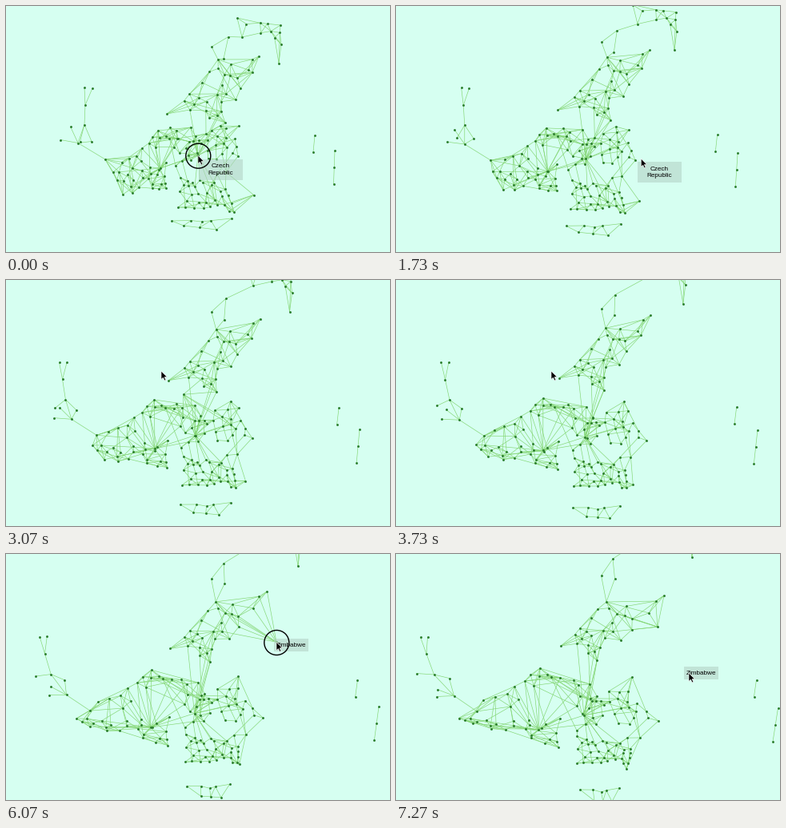
Animation, 480 px wide and 308 px high, one loop 7.34 s. Source, as a matplotlib script:

```python
import random

import numpy as np
import matplotlib.pyplot as plt
from matplotlib.animation import FuncAnimation
from matplotlib.collections import LineCollection
from matplotlib.patches import Circle, Polygon, Rectangle

W, H, DPI = 480, 308, 100
FRAMES, LOOP = 110, 7340
PX = 72 / DPI
BG, EDGE, NODE = "#d6fff1", "#84d674", "#2a7d2c"
rng = random.Random(11)

# How far the layout has spread, by frame
BEATS = [0, 16, 37, 55, 74, 100, 108]
SPREAD = [0, .185, .318, .615, .712, .9, 1]

start, end, group, edges = [], [], {}, set()


def add(name, a, b):
    """Add one node that goes from a to b over the loop."""
    start.append(np.array(a, float))
    end.append(np.array(b, float))
    group.setdefault(name, []).append(len(start) - 1)
    return len(start) - 1


def join(i, j):
    if i != j:
        edges.add((min(i, j), max(i, j)))


def strand(a, b, a2, b2, count):
    """A straight chain of evenly spaced nodes."""
    a, b, a2, b2 = map(np.array, (a, b, a2, b2))
    ids = [add("strand", a + (b - a) * t, a2 + (b2 - a2) * t)
           for t in np.linspace(0, 1, count)]
    for i, j in zip(ids, ids[1:]):
        join(i, j)


def blend(quad, u, v):
    a, b, c, d = np.array(quad, float)
    return (a * (1 - u) + b * u) * (1 - v) + (d * (1 - u) + c * u) * v


def patch(name, quad, quad2, count):
    """Scatter nodes over a quad, corners first, spaced well apart."""
    spots = [(0, 0), (1, 0), (1, 1), (0, 1)]
    while len(spots) < count:
        tries = [(rng.random(), rng.random()) for _ in range(4)]
        spots.append(max(tries, key=lambda s: min(
            np.hypot(*(blend(quad, *s) - blend(quad, *q))) for q in spots)))
    for s in spots:
        add(name, blend(quad, *s), blend(quad2, *s))


strand((386, 162), (384, 183), (450.5, 157.5), (447.5, 178.5), 2)
strand((411, 181), (409.5, 223), (477.5, 193), (471, 235), 3)

# Western branch: a stem, its fork and a spray of leaves
fork = add("branch", (99, 124), (38, 125))
knot = add("branch", (98, 148.5), (47.5, 151))
elbow = add("branch", (90, 171.5), (72.5, 177.5))
side = add("branch", (107, 169.5), (66.5, 155.5))
root = add("branch", (124, 192), (101, 197))
for a, b, hub in [((98, 102), (30.5, 104), fork), ((108, 103), (39.5, 103.5), fork),
                  ((92.5, 170), (25.5, 149.5), knot), ((80.5, 151), (51.5, 169.5), elbow),
                  ((68, 167.5), (50.5, 178.5), elbow)]:
    join(add("branch", a, b), hub)
for i, j in [(fork, knot), (knot, elbow), (knot, side), (side, elbow), (elbow, root)]:
    join(i, j)

# The top cluster leaves the stage in one piece, hanging on a loose chain
top = np.array([(289, 15), (343, 24), (344, 48), (295, 39)])
lift = np.array([29, -68])
patch("top", top, top + lift, 11)
tail = add("top", (341, 71.5), (370, 3.5))
bend = add("chain", (278, 38.5), (271, 6))
left = add("chain", (257, 51), (256.5, 27))
right = add("chain", (272, 66), (273.5, 31))

# Nodes with a part of their own
czech = add("centre", (238, 188), (235, 202))
latvia = add("centre", (250, 160), (243, 181))
zimbabwe = add("north", (308, 83), (305, 61))
west_hub = add("west", (193, 203), (178, 220))
add("centre", (268, 150), (295, 154))
spur = add("south", (309.5, 236.5), (288, 269))

patch("north", [(265, 67), (316, 63), (274, 146), (201, 135)],
      [(260, 56), (320, 32), (251, 133), (206, 115)], 29)
patch("arm", [(145, 195.5), (190, 156), (215, 166), (158, 203)],
      [(109, 183), (180, 143), (205, 155), (143, 191)], 14)
patch("west", [(134, 208), (200, 196), (200, 228), (146, 236)],
      [(78.5, 205.5), (205, 206), (203, 242), (96, 212)], 25)
patch("centre", [(205, 152), (291, 150), (290, 188), (212, 200)],
      [(222, 158), (290, 172), (328, 209), (226, 221)], 34)
patch("south", [(218, 215), (275, 208), (285, 258), (215, 252)],
      [(226, 228), (305, 230), (290, 262), (226, 262)], 34)
patch("foot", [(207, 269), (282, 266), (263, 280), (222, 275)],
      [(230, 295), (279, 293), (270, 310), (248, 309)], 8)

START, END = np.array(start), np.array(end)
LATE = START + (END - START) * .6


def gaps(i, ids):
    return np.hypot(*(LATE[ids] - LATE[i]).T)


def knit(ids, k, reach, far=0):
    """Join each node to its k nearest, plus some picks further out."""
    ids = np.array(ids)
    for i in ids:
        d = gaps(i, ids)
        order = [n for n in d.argsort()[1:] if d[n] < reach]
        picks = order[:k] + rng.sample(order[k:k + 14], min(far, len(order[k:k + 14])))
        for n in picks:
            join(i, ids[n])


def fan(hub, names, count, reach):
    pool = np.array([i for n in names for i in group[n]])
    pool = list(pool[gaps(hub, pool) < reach])
    for i in rng.sample(pool, min(count, len(pool))):
        join(hub, i)


knit(group["top"], 3, 40)
knit(group["north"], 3, 48, 1)
knit(group["arm"] + group["west"] + [root], 3, 42, 1)
knit(group["centre"] + group["south"], 2, 42, 1)
knit(group["foot"] + group["south"], 2, 38)
knit(group["arm"] + group["north"], 1, 45)
fan(west_hub, ["arm", "west"], 12, 75)
fan(west_hub, ["centre"], 4, 65)
fan(czech, ["centre", "south"], 12, 65)
fan(czech, ["north"], 4, 80)
fan(latvia, ["north", "centre"], 6, 60)
fan(root, ["arm", "west"], 4, 50)
fan(zimbabwe, ["north"], 5, 40)
fan(spur, ["south"], 2, 45)
for i in group["arm"]:
    if LATE[i, 0] > 175:
        fan(i, ["centre"], 2, 60)
north_top, top_left = group["north"][1], group["top"][3]
for i, j in [(top_left, bend), (bend, left), (bend, right), (left, north_top),
             (right, north_top), (tail, group["top"][2])]:
    join(i, j)
EDGES = np.array(sorted(edges))

# Pointer path: frame, x, y
PATH = np.array([(0, 240, 187), (3, 240, 187), (10, 300, 192), (16, 316, 197),
                 (24, 316, 197), (31, 248, 155), (37, 212, 137), (43, 194, 114),
                 (58, 194, 114), (74, 314, 67), (79, 314, 67), (82, 306, 66),
                 (97, 366, 149), (109, 366, 149)], float)
PRESSED = [(0, 10), (32, 43), (83, 98)]

# Dragged node, frames, strength of the pull towards the pointer
DRAGS = [(czech, [0, 10, 13, 16], [1, 1, .3, 0]),
         (latvia, [31, 33, 43, 47, 53], [0, 1, 1, .3, 0]),
         (zimbabwe, [82, 84, 98, 100, 104, 108], [0, 1, 1, .72, .3, .15])]

# Text, first and last frame, box size, then frames with left and top of the box
LABELS = [("Czech\nRepublic", 0, 25, 55, 26, [3, 10], [241, 302], [191.5, 195]),
          ("Latvia", 31, 45, 28, 16, [31, 45], [247, 247], [149, 149]),
          ("Botswana", 73, 80, 41, 17, [73, 80], [313, 313], [69, 69]),
          ("Zimbabwe", 82, 110, 43, 16, [82, 97], [306, 360], [67, 141])]

# The eastern end of the north cluster sags while it is pulled
SAG = np.zeros((len(START), 1))
ids = group["north"]
SAG[ids, 0] = np.clip((END[ids, 0] - 250) / 50, 0, 1)


def pointer(f):
    return np.array([np.interp(f, PATH[:, 0], PATH[:, c]) for c in (1, 2)])


def layout(f):
    pos = START + (END - START) * np.interp(f, BEATS, SPREAD)
    pos = pos + SAG * np.array([15, 20]) * np.interp(f, [82, 99], [0, 1])
    for i, when, pull in DRAGS:
        pos[i] += (pointer(f) - pos[i]) * np.interp(f, when, pull)
    return pos


fig = plt.figure(figsize=(W / DPI, H / DPI), dpi=DPI, facecolor=BG)
ax = fig.add_axes([0, 0, 1, 1])
ax.set_xlim(0, W)
ax.set_ylim(H, 0)
ax.axis("off")

lines = LineCollection([], colors=EDGE, linewidths=.65 * PX, zorder=1)
ax.add_collection(lines)
dots = ax.scatter([], [], s=(2.9 * PX) ** 2, c=NODE, linewidths=0, zorder=2)
box = Rectangle((0, 0), 1, 1, fc="#b3d3c6", alpha=.6, lw=0, zorder=3)
ax.add_patch(box)
text = ax.text(0, 0, "", family="Liberation Sans", size=8.2 * PX, color="black",
               ha="center", va="center", linespacing=1.35, zorder=4)
ring = Circle((0, 0), 15.5, fill=False, ec="black", lw=1.4 * PX, zorder=5)
ax.add_patch(ring)
ARROW = np.array([(0, 0), (0, 10.5), (2.4, 8.3), (4.2, 12), (5.8, 11.2),
                  (4.1, 7.6), (7.4, 7.5)])
arrow = Polygon(ARROW, fc="black", ec="white", lw=.6 * PX, zorder=6)
ax.add_patch(arrow)


def draw(f):
    pos = layout(f)
    lines.set_segments(pos[EDGES])
    dots.set_offsets(pos)

    tip = pointer(f)
    arrow.set_xy(ARROW + tip)
    ring.set_center(tip + (.3, .7))
    ring.set_visible(any(a <= f <= z for a, z in PRESSED))

    shown = [l for l in LABELS if l[1] <= f <= l[2]]
    box.set_visible(bool(shown))
    text.set_visible(bool(shown))
    if shown:
        words, _, _, w, h, when, xs, ys = shown[0]
        x, y = np.interp(f, when, xs), np.interp(f, when, ys)
        box.set_bounds(x, y, w, h)
        text.set_text(words)
        text.set_position((x + w / 2, y + h / 2 + .5))
    return lines, dots, box, text, ring, arrow


anim = FuncAnimation(fig, draw, frames=FRAMES, interval=LOOP / FRAMES,
                     repeat=True, repeat_delay=0, blit=False)
plt.show()
```
